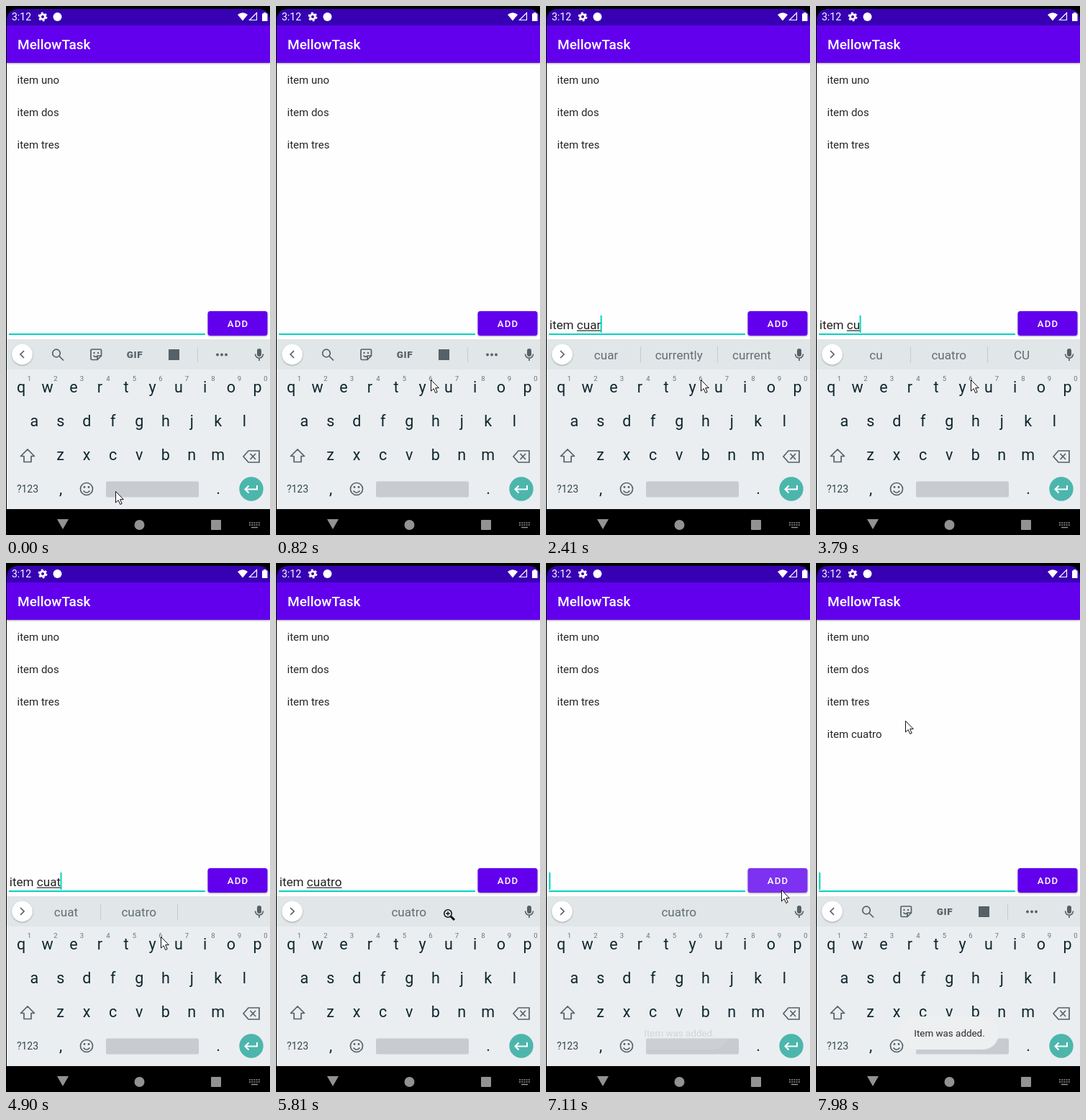
These frames come from a looping animation (367 px wide and 735 px high, 8000 ms). An HTML page:

```html
<!DOCTYPE html>
<html lang="en">
<head>
<meta charset="utf-8">
<title>Todo list</title>
<style>
  html, body { margin: 0; width: 100%; height: 100%; overflow: hidden; background: #000; }
  svg { display: block; width: 367px; height: 735px; font-family: Roboto, sans-serif; }
  .mid { text-anchor: middle; }
  .key { font-size: 21.5px; fill: #10262d; }
  .hint { font-size: 9.5px; fill: #68747a; }
  .word { font-size: 17.1px; fill: #626d73; }
  .item { font-size: 15px; fill: #252525; }
  .line { fill: none; stroke: #566167; stroke-width: 1.7; }
  .soft { fill: #566167; }
</style>
</head>
<body>
<svg viewBox="0 0 367 735">
  <defs>
    <filter id="shade" x="-20%" y="-20%" width="140%" height="160%">
      <feDropShadow dx="0" dy="1" stdDeviation="1" flood-opacity=".35"/>
    </filter>
    <clipPath id="screen"><path d="M1 735V22Q1 4 19 4H349Q367 4 367 22V735Z"/></clipPath>
  </defs>
  <rect width="367" height="735" fill="#000"/>
  <g clip-path="url(#screen)">
    <rect y="27" width="367" height="436" fill="#fefefe"/>
    <rect y="4" width="367" height="23" fill="#3700b3"/>
    <rect y="27" width="367" height="52" fill="#6200ee" filter="url(#shade)"/>
    <rect y="4" width="367" height="23" fill="#3700b3"/>
  </g>

  <g fill="#fff">
    <text x="8" y="20" font-size="14">3:12</text>
    <circle cx="51" cy="15" r="3.4" fill="none" stroke="#fff" stroke-width="2.8"/>
    <circle cx="51" cy="15" r="5.4" fill="none" stroke="#fff" stroke-width="2" stroke-dasharray="2.8 2.85"/>
    <circle cx="71.5" cy="15" r="6"/>
    <path d="M322 12Q329 6.5 336 12L329 20.5Z"/>
    <path d="M338.5 19.5H348.5V9.5Z" fill="none" stroke="#fff" stroke-width="1.2"/>
    <path d="M356 10.5H358V9H361.500V10.5H363.5V21H356Z"/>
    <text x="16" y="60" font-size="19" font-weight="500">MellowTask</text>
  </g>

  <g class="item">
    <text x="15.500" y="108">item uno</text>
    <text x="15.5" y="153">item dos</text>
    <text x="15.5" y="198">item tres</text>
    <text x="15.5" y="243" id="added">item cuatro</text>
  </g>

  <rect x="4" y="455" width="273" height="2" fill="#03d3c2"/>
  <text id="done" x="4.8" y="449" font-size="17.1" fill="#222" xml:space="preserve"></text>
  <text id="active" y="449" font-size="17.1" fill="#222"></text>
  <rect id="underline" y="450.500" height="1.2" fill="#222"/>
  <rect id="caret" y="430" width="2" height="24" fill="#03d3c2"/>
  <rect id="button" x="280.500" y="424" width="83" height="34" rx="3.5" fill="#6200ee" filter="url(#shade)"/>
  <text x="322.5" y="446" class="mid" font-size="13.2" font-weight="500" letter-spacing="1.1" fill="#fff">ADD</text>

  <rect x="1" y="463" width="366" height="42" fill="#e1e6e8"/>
  <rect x="1" y="505" width="366" height="194" fill="#eaeef1"/>
  <circle cx="22.500" cy="484" r="14.2" fill="#fff" filter="url(#shade)"/>
  <path id="chevron" class="line"/>
  <g class="soft">
    <rect x="349" y="476" width="6" height="11" rx="3"/>
    <path class="line" d="M346.500 483.500Q347 489 352 489T357.500 483.500M352 489V493"/>
  </g>

  <g id="tools">
    <circle class="line" cx="70" cy="482.500" r="5.300"/>
    <path class="line" d="M74 486.500L80 492.500" stroke-width="2.200"/>
    <path class="line" d="M120 477H131Q132.500 477 132.500 478.500V486L127 491.500H119.500Q118 491.500 118 490V478.500Q118 477 120 477M127 491V486H132M121.500 485.500Q124 489 127 486"/>
    <circle class="soft" cx="122.500" cy="482" r="1.200"/><circle class="soft" cx="128" cy="482" r="1.200"/>
    <text class="mid soft" x="179" y="489" font-size="13.500" font-weight="900" letter-spacing=".6">GIF</text>
    <rect class="soft" x="226" y="477" width="15" height="15"/>
    <path d="M266.500 474V495" stroke="#c5cbce"/>
    <circle class="soft" cx="294" cy="484.500" r="1.900"/><circle class="soft" cx="300" cy="484.500" r="1.900"/><circle class="soft" cx="306" cy="484.500" r="1.900"/>
  </g>
  <path id="dividers" d="M131.500 473V496M238.500 473V496" stroke="#c5cbce"/>
  <g id="words" class="word mid"></g>

  <g id="keys"></g>
  <path class="line" d="M30 616L39.500 625.500H35V633.500H25V625.500H20.500Z" stroke-linejoin="round"/>
  <path class="line" d="M337 618H352V634H337L330 626ZM339.500 622L347 630M347 622L339.500 630"/>
  <text class="mid" x="30" y="676" font-size="14" fill="#35474e">?123</text>
  <text class="mid key" x="76" y="678" font-size="19">,</text>
  <text class="mid key" x="295" y="678" font-size="19">.</text>
  <circle class="line" cx="112" cy="671" r="8.500"/>
  <path class="line" d="M107.500 673.500Q112 679 116.500 673.500"/>
  <circle class="soft" cx="109" cy="668.500" r="1.400"/><circle class="soft" cx="115" cy="668.500" r="1.400"/>
  <rect x="139" y="660.500" width="129" height="22" rx="2" fill="#c8ccd0"/>
  <circle cx="341" cy="671" r="16.700" fill="#4db6ac"/>
  <path d="M349 666V671.500H333M337.500 666.500L332.500 671.500L337.500 676.500" fill="none" stroke="#fff" stroke-width="2"/>

  <g fill="#929292">
    <path d="M71 713H87L79 727Z"/>
    <circle cx="185.500" cy="721" r="7"/>
    <rect x="285" y="714" width="14" height="14" rx="1"/>
    <path d="M338 718H353M338 721H353" stroke="#929292" stroke-width="1.600" stroke-dasharray="2 1.200"/>
    <path d="M341 724.500H350" stroke="#929292" stroke-width="1.500"/>
  </g>

  <g id="toast">
    <rect x="116" y="630" width="138" height="46" rx="22" fill="#eeeff0"/>
    <text class="mid" x="185.500" y="658" font-size="13.400" fill="#2b2b2b">Item was added.</text>
  </g>

  <path id="arrow" d="M.5 .5V16L4.200 12.600L6.700 18.500L9.200 17.400L6.700 11.600H11.300Z" fill="#fff" stroke="#111"/>
  <g id="lens">
    <path d="M3 3L8 8" stroke="#111" stroke-width="3"/>
    <circle cx="-1" cy="-1" r="5.200" fill="#fff" stroke="#111" stroke-width="1.600"/>
    <path d="M-4 -1H2M-1 -4V2" stroke="#111" stroke-width="1.400"/>
  </g>
</svg>
<script>
const $ = id => document.getElementById(id);
const LOOP = 8000;

function addText(parent, text, x, y, cls) {
  const node = document.createElementNS("http://www.w3.org/2000/svg", "text");
  node.textContent = text;
  node.setAttribute("x", x);
  node.setAttribute("y", y);
  node.setAttribute("class", cls);
  parent.append(node);
  return node;
}

function set(id, attrs) {
  for (const name in attrs) $(id).setAttribute(name, attrs[name]);
}

const show = (id, on) => set(id, { visibility: on ? "visible" : "hidden" });

[["qwertyuiop", 21, 537], ["asdfghjkl", 39.3, 583.5], ["zxcvbnm", 75.7, 631]].forEach(([row, x0, y], r) => {
  [...row].forEach((letter, i) => {
    const x = x0 + 36.5 * i;
    addText($("keys"), letter, x, y, "key mid");
    if (!r) addText($("keys"), (i + 1) % 10, x + 11.5, 521, "hint mid");
  });
});
const words = [83.5, 184.7, 286].map(x => addText($("words"), "", x, 491, "word mid"));

// Each step changes only the properties it lists.
const steps = [
  [0, { done: "", active: "", caret: 0, words: [], mouse: [152, 674], lens: 0, toast: 0, added: 0, button: "#6200ee" }],
  [150, { mouse: [286, 689] }],
  [270, { mouse: [215, 519], caret: 1 }],
  [820, { caret: 0 }],
  [1230, { active: "i", caret: 1, words: ["i", "I", "in"] }],
  [1350, { active: "it", words: ["it", "its", "it's"] }],
  [1470, { active: "ite", words: ["ite", "item", "items"] }],
  [1620, { active: "item", words: ["item", "items", "itemized"] }],
  [1770, { done: "item ", active: "", words: ["is", "in", "and"] }],
  [1890, { active: "c", words: ["c", "can", "could"] }],
  [2160, { active: "cu", words: ["cu", "cuatro", "CU"] }],
  [2280, { active: "cua", words: ["cua", "cuatro", "Cua"] }],
  [2410, { active: "cuar", words: ["cuar", "currently", "current"] }],
  [2960, { done: "item cuar ", active: "", words: ["is", "in", "to"] }],
  [3520, { done: "item ", active: "cuar" }],
  [3640, { active: "cua" }],
  [3790, { active: "cu", words: ["cu", "cuatro", "CU"] }],
  [4380, { caret: 0 }],
  [4780, { active: "cua", caret: 1, words: ["cua", "cuatro", "Cua"] }],
  [4900, { active: "cuat", words: ["cuat", "cuatro", ""] }],
  [5020, { active: "cuatr", words: ["cuatr", "cuatro", ""] }],
  [5290, { active: "cuatro", words: ["", "cuatro"] }],
  [5690, { caret: 0, mouse: [218, 514] }],
  [5810, { mouse: [240, 488], lens: 1 }],
  [5930, { mouse: [307, 420], lens: 0 }],
  [6050, { mouse: [275, 398] }],
  [6200, { mouse: [268, 375], caret: 1 }],
  [6320, { mouse: [275, 433] }],
  [6470, { mouse: [325, 448] }],
  [6590, { mouse: [344, 461] }],
  [6710, { mouse: [327, 454], caret: 0 }],
  [6980, { button: "#7425ef" }],
  [7110, { done: "", active: "", caret: 1, button: "#7c32f0", toast: .12 }],
  [7260, { added: 1, button: "#6200ee", toast: .6 }],
  [7410, { words: [], mouse: [299, 451], toast: .88 }],
  [7570, { mouse: [164, 415], caret: 0, toast: 1 }],
  [7710, { mouse: [124, 231] }],
  [7860, { mouse: [124, 219] }],
  [7980, { caret: 1 }]
];

function draw(s) {
  $("done").textContent = s.done;
  const start = 4.8 + (s.done ? $("done").getComputedTextLength() : 0);
  $("active").textContent = s.active;
  const width = s.active ? $("active").getComputedTextLength() : 0;
  set("active", { x: start });
  set("underline", { x: start, width });
  set("caret", { x: start + width - .6 });
  show("caret", s.caret);

  const typing = s.words.length > 0;
  show("tools", !typing);
  show("dividers", s.words.length === 3);
  set("chevron", { d: typing ? "M20 479L25 484L20 489" : "M25 479L20 484L25 489" });
  words.forEach((node, i) => node.textContent = s.words[i] || "");

  show("added", s.added);
  set("button", { fill: s.button });
  set("toast", { opacity: s.toast });
  show("arrow", !s.lens);
  show("lens", s.lens);
  for (const id of ["arrow", "lens"]) set(id, { transform: `translate(${s.mouse})` });
}

let shown = -1;
function tick() {
  const time = performance.now() % LOOP;
  const index = steps.filter(([at]) => at <= time).length - 1;
  if (index !== shown) {
    shown = index;
    draw(Object.assign({}, ...steps.slice(0, index + 1).map(step => step[1])));
  }
  requestAnimationFrame(tick);
}
tick();
</script>
</body>
</html>
```
